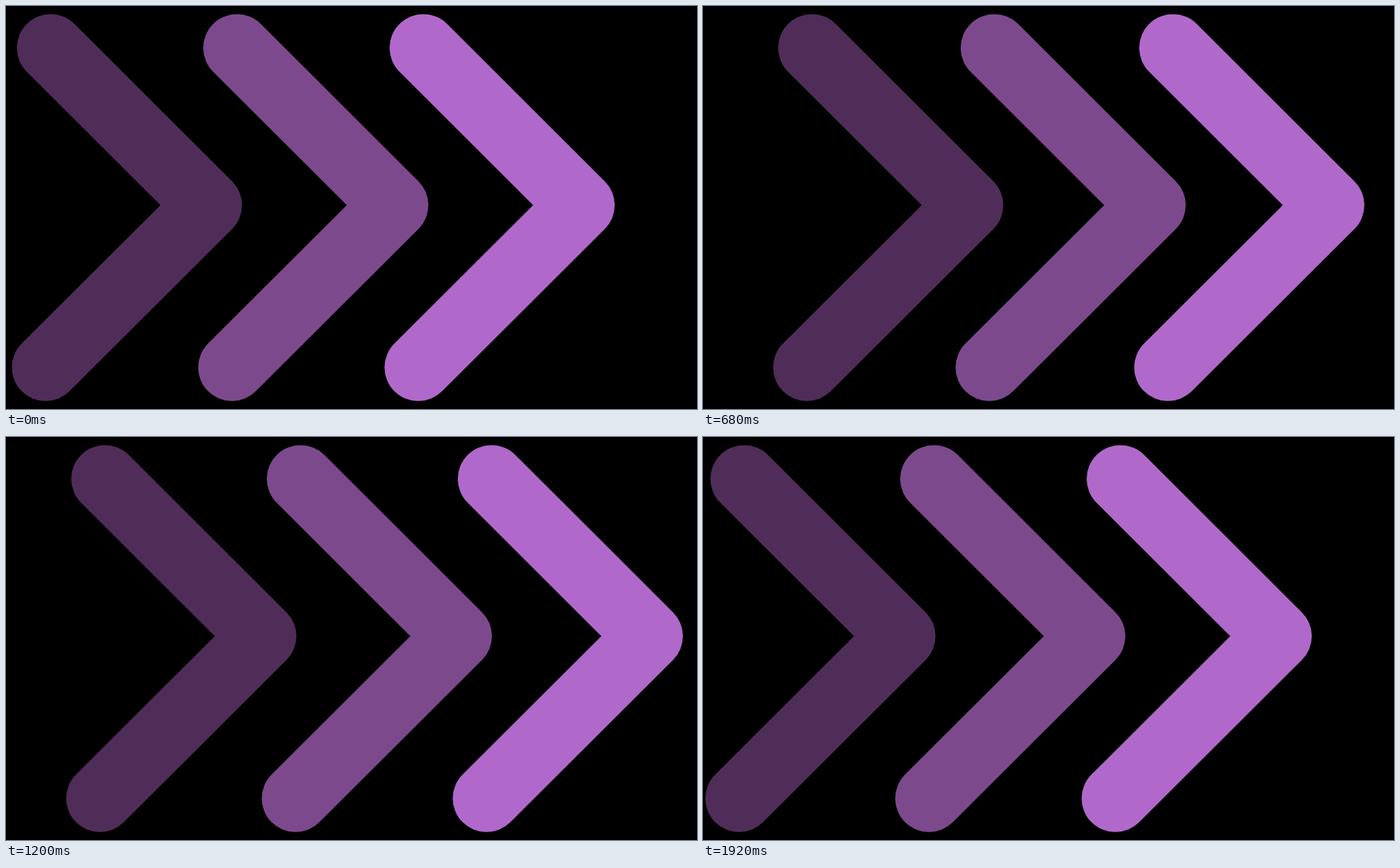
Write an HTML page that moves like this. It is 890 by 520 pixels and loops after 2 s.

```html
<!DOCTYPE html>
<html lang="en">
<head>
<meta charset="utf-8">
<title>Chevrons</title>
<style>
  html, body { margin: 0; width: 100%; height: 100%; overflow: hidden; background: #000; }
  svg { display: block; width: 890px; height: 520px; }
  path { fill: none; stroke-width: 87; stroke-linecap: round; stroke-linejoin: round; }
</style>
</head>
<body>
<svg viewBox="0 0 890 520">
  <path d="M57.5 54 L260.5 257 L51 466.3" stroke="#502d59"/>
  <path d="M57.5 54 L260.5 257 L51 466.3" stroke="#7d498d"/>
  <path d="M57.5 54 L260.5 257 L51 466.3" stroke="#b069ca"/>
</svg>
<script>
  const LOOP = 2000, STEP = 40;

  // Each leg is [start ms, duration ms, distance px].
  const chevrons = [
    { x: 0,   out: [0, 862, 93.5], back: [858, 955, 98] },
    { x: 240, out: [94, 828, 98],  back: [906, 968, 98] },
    { x: 480, out: [150, 840, 98], back: [955, 990, 98] }
  ];
  const paths = document.querySelectorAll('path');

  const smooth = u => u * u * (3 - 2 * u);
  // Closed form of cubic-bezier(.5, 0, .5, 1)
  const strong = u => smooth(0.5 + Math.sinh(Math.asinh(4 * u - 2) / 3));

  function leg(t, [start, duration, distance], ease) {
    const u = Math.min(1, Math.max(0, (t - start) / duration));
    return distance * ease(u);
  }

  function draw(t) {
    chevrons.forEach(({ x, out, back }, i) => {
      const dx = x + leg(t, out, smooth) - leg(t, back, strong);
      paths[i].setAttribute('transform', `translate(${dx.toFixed(2)} 0)`);
    });
  }

  const origin = performance.now();
  function tick() {
    const t = (performance.now() - origin) % LOOP;
    draw(Math.floor(t / STEP) * STEP);
    requestAnimationFrame(tick);
  }
  tick();
</script>
</body>
</html>
```
